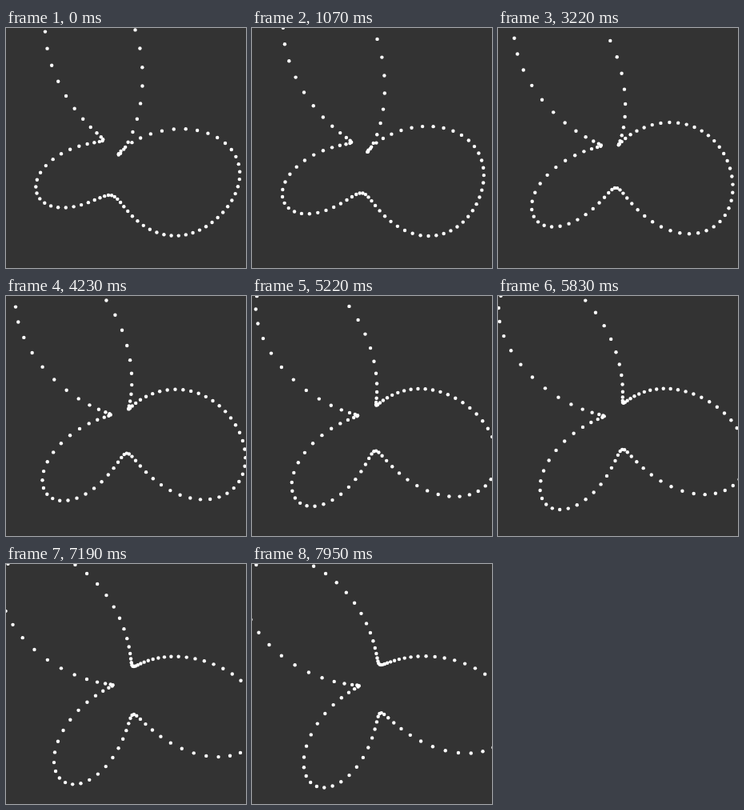
An HTML page with a canvas that plays this animation: 300 by 300 pixels, repeating every 8000 ms.

```html
<!DOCTYPE html>
<html lang="en">
<head>
<meta charset="utf-8">
<title>Dotted wave ring</title>
<style>
  html, body { margin: 0; width: 100%; height: 100%; overflow: hidden; background: #333; }
  canvas { display: block; }
</style>
</head>
<body>
<canvas id="stage" width="300" height="300"></canvas>
<script>
  const LOOP = 8;
  const SIZE = 300;
  const DOTS = 100;
  const CENTER = 149;
  const BASE_RADIUS = 100;
  const DOT_RADIUS = 2.2;
  const RAD = Math.PI / 180;

  // Angles in degrees, speeds in degrees per second.
  const spin = { start: 1.28, speed: 5.15 };
  const waves = [
    { lobes: 2, size: 44, phase: -109.6, speed: 5.02 },
    { lobes: 3, size: 60, phase: -55.1, speed: 7.62 },
    { lobes: 4, size: 30, phase: 69.1, speed: 20.36 }
  ];

  const ctx = document.getElementById('stage').getContext('2d');

  function radiusAt(angle, t) {
    return waves.reduce((sum, w) =>
      sum + w.size * Math.cos((w.lobes * angle + w.phase + w.speed * t) * RAD), BASE_RADIUS);
  }

  function draw(t) {
    ctx.fillStyle = '#333';
    ctx.fillRect(0, 0, SIZE, SIZE);
    ctx.fillStyle = '#fff';
    for (let i = 0; i < DOTS; i++) {
      const angle = spin.start + spin.speed * t + i * 360 / DOTS;
      const r = radiusAt(angle, t);
      ctx.beginPath();
      ctx.arc(CENTER + r * Math.cos(angle * RAD), CENTER + r * Math.sin(angle * RAD),
        DOT_RADIUS, 0, 2 * Math.PI);
      ctx.fill();
    }
  }

  const begin = performance.now();
  function tick() {
    draw((performance.now() - begin) / 1000 % LOOP);
    requestAnimationFrame(tick);
  }
  tick();
</script>
</body>
</html>
```
